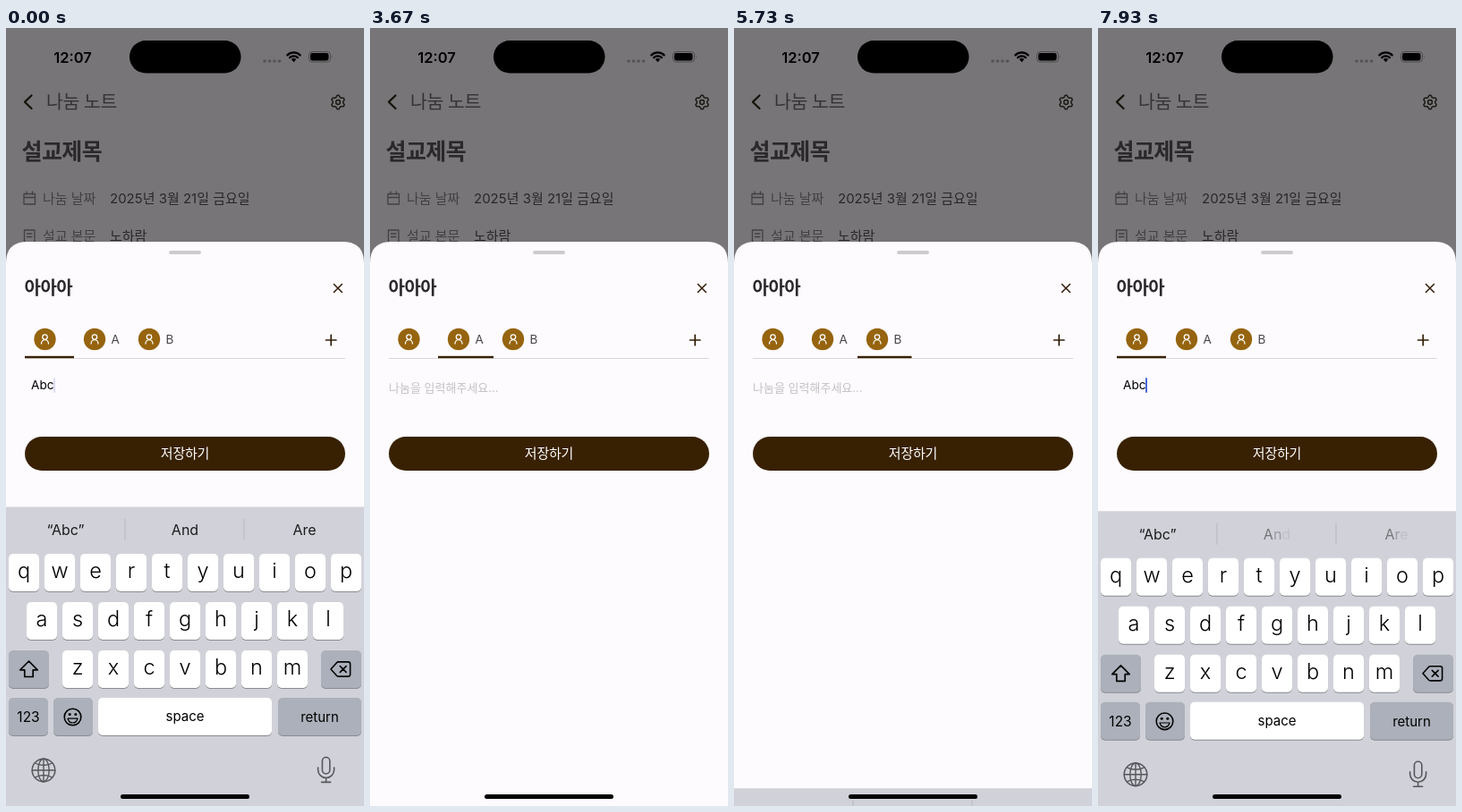
Write an HTML page that moves like this. It is 400 by 870 pixels and loops after 8 s.

```html
<!DOCTYPE html>
<html lang="ko">
<head>
<meta charset="utf-8">
<style>
html, body { margin: 0; width: 100%; height: 100%; overflow: hidden; background: #777578; }
svg { display: block; width: 400px; height: 870px; }
text { font-family: Inter, "Noto Sans CJK KR", "Noto Sans CJK", sans-serif; white-space: pre; }
</style>
</head>
<body>
<svg id="stage" viewBox="0 0 400 870"></svg>
<script>
const LOOP = 8000, DROP = 335;
// Each swap: keyboard leaves, tab changes, keyboard returns.
const SWAPS = [
  { down: 3092, up: 3707, tab: 1 },
  { down: 5484, up: 6100, tab: 2 },
  { down: 6966, up: 7590, tab: 0 }
];
const TABS = [[21, 55], [76, 62], [138, 60.5]];
const TYPED = ['“Abc”', 'And', 'Are'], EMPTY = ['I', 'The', 'I’m'];
const INK = '#1c1c1e', BROWN = '#382102', GREY_KEY = '#abb0ba';

const rect = (x, y, w, h, r, fill, extra = '') =>
  `<rect x="${x}" y="${y}" width="${w}" height="${h}" rx="${r}" fill="${fill}" ${extra}/>`;
const line = (d, color, width, fill = 'none') =>
  `<path d="${d}" fill="${fill}" stroke="${color}" stroke-width="${width}" stroke-linecap="round" stroke-linejoin="round"/>`;
const ring = (x, y, r, color, width) =>
  `<circle cx="${x}" cy="${y}" r="${r}" fill="none" stroke="${color}" stroke-width="${width}"/>`;
const dot = (x, y, r, fill) => `<circle cx="${x}" cy="${y}" r="${r}" fill="${fill}"/>`;
const text = (s, x, y, size, fill = INK, weight = 400, anchor = 'start', extra = '') =>
  `<text x="${x}" y="${y}" font-size="${size}" fill="${fill}" font-weight="${weight}" text-anchor="${anchor}" ${extra}>${s}</text>`;

function gear(x, y) {
  let d = '';
  for (let i = 0; i < 24; i++) {
    const a = (i + 0.5) * Math.PI / 12, r = i % 4 < 2 ? 7.7 : 5.9;
    d += `${i ? 'L' : 'M'}${x + r * Math.sin(a - Math.PI / 12)} ${y - r * Math.cos(a - Math.PI / 12)}`;
  }
  return line(d + 'Z', '#1c1a12', 1.5) + ring(x, y, 2.4, '#1c1a12', 1.5);
}

function statusBar() {
  const arc = r => line(`M${321.5 - r * .7} ${37.5 - r * .7}A${r} ${r} 0 0 1 ${321.5 + r * .7} ${37.5 - r * .7}`, '#000', 2.3);
  return text('12:07', 74.5, 38.5, 16.5, '#000', 600, 'middle')
    + rect(138, 14, 124.5, 36.5, 18.2, '#000')
    + [289, 294.5, 300, 305.5].map(x => dot(x, 37, 1.8, '#555356')).join('')
    + arc(10.2) + arc(6.3) + '<path d="M318.8 35A4 4 0 0 1 324.2 35L321.5 38.2Z"/>'
    + rect(338.5, 26.5, 24, 11.5, 3.8, 'none', 'stroke="#4c4a4d"')
    + rect(340, 28, 20.5, 8.5, 2.4, '#000')
    + '<path d="M364 30.3q1.6 2 0 4z" fill="#4c4a4d"/>';
}

function page() {
  const label = '#414044', value = '#29272a';
  return statusBar()
    + line('M28.5 75.5L21 82.7L28.5 90', '#161409', 2.3)
    + text('나눔 노트', 45, 90, 20.5, '#343235', 500, 'start', 'letter-spacing="-.4"')
    + gear(371, 83)
    + text('설교제목', 17.5, 146.5, 25, '#2a282b', 700, 'start', 'letter-spacing="-.6"')
    + line('M20 185.5h12.5v11.5h-12.5zM20 189.5h12.5M23 183v3M29.5 183v3', label, 1.3)
    + text('나눔 날짜', 41, 195.5, 15, label)
    + text('2025년 3월 21일 금요일', 116, 195.5, 15, value)
    + line('M20.5 226h11.5v14h-11.5zM23.5 230h5.5M23.5 233.5h5.5', label, 1.3)
    + text('설교 본문', 41, 238, 15, label)
    + text('노하람', 116, 238, 15, value);
}

function sheet() {
  const person = x => dot(x, 348, 12.2, '#96640f') + ring(x, 345.6, 2.7, '#fff', 1.3)
    + line(`M${x - 4} 353A4 4.4 0 0 1 ${x + 4} 353`, '#fff', 1.3);
  return '<path d="M0 870V263Q0 239 24 239H376Q400 239 400 263V870Z" fill="#fefbff"/>'
    + rect(182, 249, 36, 4, 2, '#cdcacd')
    + text('아아아', 20.5, 298, 20, '#2b292c', 700, 'start', 'letter-spacing="-.5"')
    + line('M366.4 286.5l9 9m0-9l-9 9', '#33200a', 1.6)
    + [43.5, 99, 160].map(person).join('')
    + text('A', 117.5, 353, 13.5, '#4a474c') + text('B', 178.5, 353, 13.5, '#4a474c')
    + line('M357.5 349h11.4m-5.7-5.7v11.4', '#33200a', 1.7)
    + rect(21, 369, 358, 1, 0, '#d9d5d9')
    + rect(21, 366.8, 55, 2.4, 0, BROWN, 'id="mark"')
    + text('Abc', 28, 404, 13.6, '#000', 400, 'start', 'id="entry"')
    + text('나눔을 입력해주세요...', 21, 407, 13, '#c3c0c4', 400, 'start', 'id="hint"')
    + rect(20.8, 391, 2, 17, 1, '#4a66d6', 'id="caret"')
    + rect(21, 457, 358, 38, 19, BROWN)
    + text('저장하기', 200, 481.2, 15, '#fff', 500, 'middle', 'letter-spacing="-.2"');
}

const key = (x, y, w, fill = '#fff') => rect(x, y + 1, w, 42, 5, '#898b90') + rect(x, y, w, 42, 5, fill);

function letters(upper) {
  const rows = [['qwertyuiop', 3, 588], ['asdfghjkl', 23, 642], ['zxcvbnm', 63, 696]];
  const caps = rows.map(([row, x0, y]) => [...row].map((c, i) => {
    const x = x0 + 40 * i;
    return key(x, y, 34) + text(upper ? c.toUpperCase() : c, x + 17, y + (upper ? 29.3 : 27.3),
      upper ? 22 : 23.5, '#000', upper ? 400 : 300, 'middle');
  }).join('')).join('');
  const arrow = line('M25.5 708L15.8 717.8H20.8V725.5H30.2V717.8H35.2Z', '#000', 1.7, upper ? '#000' : 'none');
  return `<g id="${upper ? 'upper' : 'lower'}">${caps}${key(3, 696, 45, upper ? '#fff' : GREY_KEY)}${arrow}</g>`;
}

function keyboard() {
  const icon = '#55575c';
  return rect(0, 535.5, 400, 700, 0, '#d1d2d9')
    + [133, 266].map(x => rect(x - .5, 549, 1, 24, 0, '#b6b8bf')).join('')
    + [66.5, 200, 333.5].map((x, i) => text('', x, 567, 16, INK, 400, 'middle', `id="word${i}"`)).join('')
    + letters(false) + letters(true)
    + key(352, 696, 45, GREY_KEY)
    + line('M363 717l6.5-7.3q.7-.8 1.8-.8h11q2.3 0 2.3 2.3v11.6q0 2.3-2.3 2.3h-11q-1.1 0-1.8-.8zM373.3 713.6l6.8 6.8m0-6.8l-6.8 6.8', '#000', 1.6)
    + key(3, 749, 44, GREY_KEY) + text('123', 25, 776, 15.5, '#000', 400, 'middle')
    + key(53, 749, 44, GREY_KEY) + ring(74.5, 770.5, 9.3, '#000', 1.6)
    + dot(71.2, 767.5, 1.5, '#000') + dot(77.8, 767.5, 1.5, '#000')
    + line('M69 772.2H80Q78.5 777 74.5 777T69 772.2Z', '#000', 1.2)
    + key(103, 749, 194) + text('space', 200, 775, 15, '#000', 400, 'middle')
    + key(304, 749, 93, GREY_KEY) + text('return', 350.5, 776, 15, '#000', 400, 'middle')
    + ring(42, 830, 12.8, icon, 1.5)
    + `<ellipse cx="42" cy="830" rx="6.2" ry="12.8" fill="none" stroke="${icon}" stroke-width="1.4"/>`
    + line('M42 817.2v25.6M29.2 830h25.6M32.3 822q9.7 5 19.4 0M32.3 838q9.7-5 19.4 0', icon, 1.4)
    + rect(353.4, 815.5, 8.4, 18.5, 4.2, 'none', `stroke="${icon}" stroke-width="1.6"`)
    + line('M348.6 827v2.5a9 9 0 0 0 18 0V827M357.6 838.5v4.7M352.6 843.4h10', icon, 1.6);
}

const stage = document.getElementById('stage');
stage.innerHTML = page() + sheet() + `<g id="keys">${keyboard()}</g>` + rect(128, 857, 144, 5, 2.5, '#000');
const $ = id => document.getElementById(id);
const show = (id, on) => $(id).setAttribute('visibility', on ? 'visible' : 'hidden');
const clamp = v => Math.min(1, Math.max(0, v));

// Critically damped spring, 0 to 1
const spring = ms => 1 - (1 + .01826 * ms) * Math.exp(-.01826 * ms);

function steadyBlink(t) {
  const p = t % 1000;
  if (p < 130) return .2 * (1 - p / 130);
  if (p < 940) return clamp((p - 550) / 250);
  return 1 - .8 * (p - 940) / 60;
}

const freshBlink = age => 1 - clamp((age - 970) / 170) + clamp((age - 1320) / 170);

function draw(t) {
  const n = SWAPS.filter(s => s.down <= t).length;
  const swap = SWAPS[n - 1], before = n > 1 ? SWAPS[n - 2].tab : 0;
  const leaving = swap && t < swap.up;
  const tab = !swap || t < swap.down + 60 ? before : swap.tab;
  const keyTab = !swap || leaving ? before : swap.tab;

  const drop = !swap ? 0 : leaving ? spring(t - swap.down) : 1 - spring(t - swap.up);
  $('keys').setAttribute('transform', `translate(0 ${DROP * drop})`);
  show('lower', !keyTab);
  show('upper', keyTab);

  const [x, width] = TABS[tab];
  $('mark').setAttribute('x', x);
  $('mark').setAttribute('width', width);
  show('entry', !tab);
  show('hint', tab);
  $('caret').setAttribute('x', tab ? 20.8 : 53);
  $('caret').setAttribute('opacity', !swap ? steadyBlink(t) : leaving ? 0 : freshBlink(t - swap.up));

  (keyTab ? EMPTY : TYPED).forEach((word, w) => {
    const start = !keyTab && w ? 280 : 100;
    const alpha = i => !swap ? 1
      : leaving ? 1 - clamp((t - swap.down - 25 * (word.length - 1 - i)) / 70)
      : clamp((t - swap.up - start - 25 * i) / 120);
    $('word' + w).innerHTML = [...word].map((c, i) => `<tspan fill-opacity="${alpha(i)}">${c}</tspan>`).join('');
  });
}

const begin = performance.now();
function tick() {
  draw((performance.now() - begin) % LOOP);
  requestAnimationFrame(tick);
}
tick();
</script>
</body>
</html>
```
